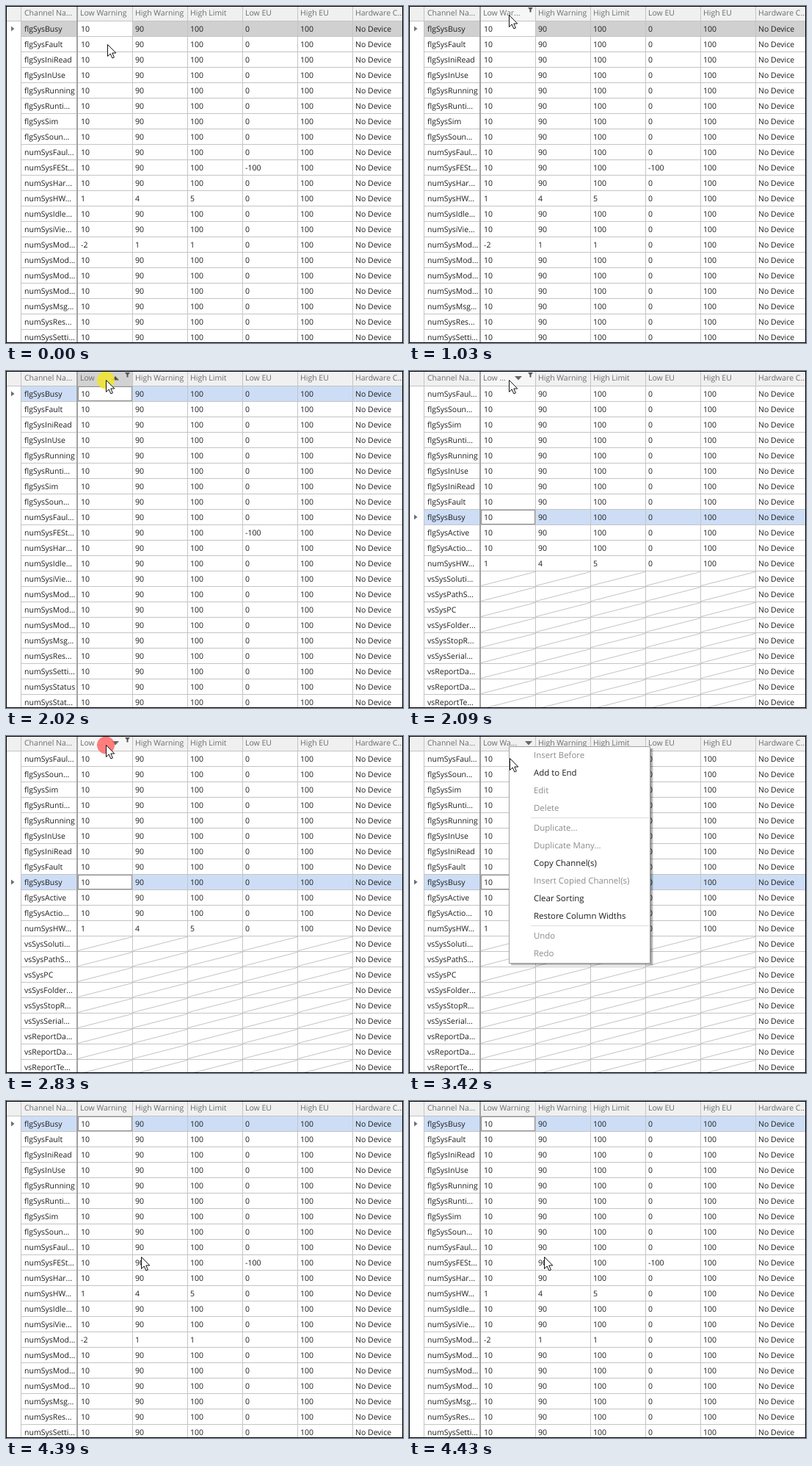
An HTML page that plays this animation: 541 px wide and 459 px high, repeating every 5120 ms.

```html
<!DOCTYPE html>
<html lang="en">
<head>
<meta charset="utf-8">
<title>Sorting a channel table</title>
<style>
html, body { margin: 0; width: 100%; height: 100%; overflow: hidden; background: #fff; }
svg { display: block; }
text { font: 10.5px "Open Sans", "Noto Sans", sans-serif; fill: #1c1c1c; text-rendering: geometricPrecision; }
.head text { fill: #6c6c6c; }
.menu text { font-size: 11.45px; }
.menu .off { fill: #8b8b8b; }
</style>
</head>
<body>
<svg width="541" height="459" viewBox="0 0 541 459">
  <g id="grid"></g>
  <g id="menu" class="menu"></g>
  <circle id="click" r="12" fill-opacity=".85"/>
  <path id="cursor" d="M.5 .5V16.5L4.2 13L6.9 19L9.4 17.9L6.8 12H11.8Z" fill="#fff" stroke="#111"/>
  <rect x=".5" y=".5" width="540" height="458" fill="none" stroke="#000"/>
</svg>
<script>
const LOOP = 5120, ROW = 21, ROWS = 21;
const edges = [20, 97, 172, 247, 322, 397, 472, 541];
const titles = ['Channel Na...', 'Low Warning', 'High Warning', 'High Limit', 'Low EU', 'High EU', 'Hardware C...'];
const usual = [10, 90, 100, 0, 100];
const special = {
  'numSysFESt...': [10, 90, 100, -100, 100],
  'numSysHW...': [1, 4, 5, 0, 100],
  'numSysMod...*': [-2, 1, 1, 0, 100]
};

const names = (prefix, list) => list.split(' ').map(s => prefix + s);
const flags = names('flgSys', 'Busy Fault IniRead InUse Running Runti... Sim Soun...');
const start = [...flags, ...names('numSys', 'Faul... FESt... Har...')];
const orders = {
  none: [...start, ...names('numSys', 'HW... Idle... iVie... Mod...* Mod... Mod... Mod... Msg... Res... Setti...')],
  up: [...start, ...names('numSys', 'Idle... iVie... Mod... Mod... Mod... Msg... Res... Setti... Status Stat...')],
  down: ['numSysFaul...', ...[...flags].reverse(), 'flgSysActive', 'flgSysActio...', 'numSysHW...',
    ...names('vsSys', 'Soluti... PathS... PC Folder... StopR... Serial...'),
    ...names('vsReport', 'Da... Da... Te...')]
};

const rect = (x, y, w, h, fill, more = '') =>
  `<rect x="${x}" y="${y}" width="${w}" height="${h}" fill="${fill}" ${more}/>`;
const text = (x, y, s, cls = '') => `<text x="${x}" y="${y}" class="${cls}">${s}</text>`;
const path = (d, fill) => `<path d="${d}" fill="${fill}"/>`;

function header(s) {
  const label = s.hover ? (s.sort === 'none' ? 'Low War...' : 'Low ...')
    : s.sort === 'none' ? titles[1] : 'Low Wa...';
  let out = rect(0, 0, 541, 20, '#f0f0f0');
  if (s.hover) out += rect(98, 0, 74, 20, s.pressed ? '#d2d2d2' : '#f6f6f6');
  titles.forEach((title, i) => out += text(edges[i] + (i ? 4 : 5), 13, i === 1 ? label : title));
  if (s.hover) out += path('M162 2H169L166.5 5V8.5H164.5V5Z', '#555');
  if (s.sort !== 'none') {
    const x = s.hover ? 149 : 163;
    out += s.sort === 'up' ? path(`M${x - 5} 12.5H${x + 5}L${x} 7Z`, '#555')
      : path(`M${x - 5} 7H${x + 5}L${x} 12.5Z`, '#666');
  }
  return `<g class="head">${out}</g>`;
}

function row(name, i, s) {
  const y = 21 + i * ROW, base = y + 14;
  const active = name === 'flgSysBusy', empty = name.startsWith('vs');
  let out = '';
  if (active) {
    out += rect(21, y, 520, 20, s.focus ? '#cdddf5' : '#d0d0d0') + rect(98, y, 74, 20, '#fff');
    if (s.focus) out += rect(98.5, y + .5, 73, 19, 'none', 'stroke="#222" stroke-dasharray="1 1"');
    out += path(`M7 ${y + 6.5}L11.5 ${y + 10}L7 ${y + 13.5}Z`, s.focus ? '#686d7c' : '#777');
  }
  out += text(25, base, name.replace('*', ''));
  (special[name] || usual).forEach((value, c) => {
    const x = edges[c + 1];
    out += empty
      ? `<path d="M${x + 1} ${y + 19.5}L${edges[c + 2]} ${y + .5}" stroke="#c3c3c3"/>`
      : text(x + (c ? 4 : 5), base, value);
  });
  return out + text(476, base, 'No Device');
}

function grid(s) {
  let out = rect(0, 0, 541, 459, '#fff') + header(s);
  out += orders[s.sort].map((name, i) => row(name, i, s)).join('');
  for (let i = 0; i < ROWS; i++) out += rect(i ? 21 : 0, 20 + i * ROW, 541, 1, '#c4c4c4');
  edges.slice(0, 7).forEach((x, i) => out += i === 1 ? rect(96, 0, 2, 459, '#a2a2a2') : rect(x, 0, 1, 459, '#c4c4c4'));
  return out;
}

// Label, text centre, enabled
const items = [
  ['Insert Before', 26], ['Add to End', 50, 1], ['Edit', 74], ['Delete', 98],
  ['Duplicate...', 125], ['Duplicate Many...', 149], ['Copy Channel(s)', 173, 1],
  ['Insert Copied Channel(s)', 197], ['Clear Sorting', 221, 1], ['Restore Column Widths', 245, 1],
  ['Undo', 272], ['Redo', 296]
];

function menu(hot) {
  let out = '';
  for (let i = 0; i < 4; i++) out += rect(139, 17, 191 + i, 293 + i, '#000', 'opacity=".12"');
  out += rect(136.5, 14.5, 192, 295, '#fff', 'stroke="#a0a0a0"');
  for (const y of [111, 258]) out += rect(166, y, 161, 1, '#dcdcdc');
  items.forEach(([label, y, on], i) => {
    if (i === hot) out += rect(138, y - 12, 189, 24, '#cdddf5');
    out += text(170, y + 4, label, on ? '' : 'off');
  });
  return out;
}

const down = [[137, 30], [142, 55], [149, 86], [157, 117], [165, 146], [172, 169], [179, 187], [183, 199]];

function cursorAt(t) {
  if (t < 550) return [138, 52];
  if (t < 3420) {
    const p = Math.min(8, Math.floor((t - 550) / 68.5) + 1) / 8;
    const e = p * p * (3 - 2 * p);
    return [Math.round(138 - 2 * e), Math.round(52 - 40 * e)];
  }
  if (t < 3960) return down[Math.min(7, Math.floor((t - 3420) / 67.1))];
  return t < 4030 ? [184, 207] : [184, 212];
}

const within = (t, from, length) => t >= from && t < from + length;
const el = id => document.getElementById(id);
const cache = {};

function paint(id, key, draw) {
  if (cache[id] === key) return;
  cache[id] = key;
  el(id).innerHTML = draw();
}

function render(t) {
  const [x, y] = cursorAt(t);
  const open = t >= 2970 && t < 4250;
  const pressed = within(t, 1420, 70) || within(t, 2020, 70);
  const red = within(t, 2830, 140);
  const state = {
    sort: t < 1490 || t >= 4360 ? 'none' : t < 2090 ? 'up' : 'down',
    focus: t >= 1420,
    hover: y < 20 && !open,
    pressed
  };
  const hot = items.findIndex(([, mid, on]) => on && y >= mid - 12 && y < mid + 12 && x > 137);
  paint('grid', JSON.stringify(state), () => grid(state));
  paint('menu', open ? hot : 'closed', () => open ? menu(hot) : '');

  const click = el('click');
  click.setAttribute('cx', x);
  click.setAttribute('cy', y + .5);
  click.setAttribute('fill', red ? '#ff6868' : '#f2e52c');
  click.style.display = pressed || red || within(t, 4180, 70) ? '' : 'none';
  el('cursor').setAttribute('transform', `translate(${x} ${y})`);
}

const begin = performance.now();
function tick() {
  render((performance.now() - begin) % LOOP);
  requestAnimationFrame(tick);
}
tick();
</script>
</body>
</html>
```
